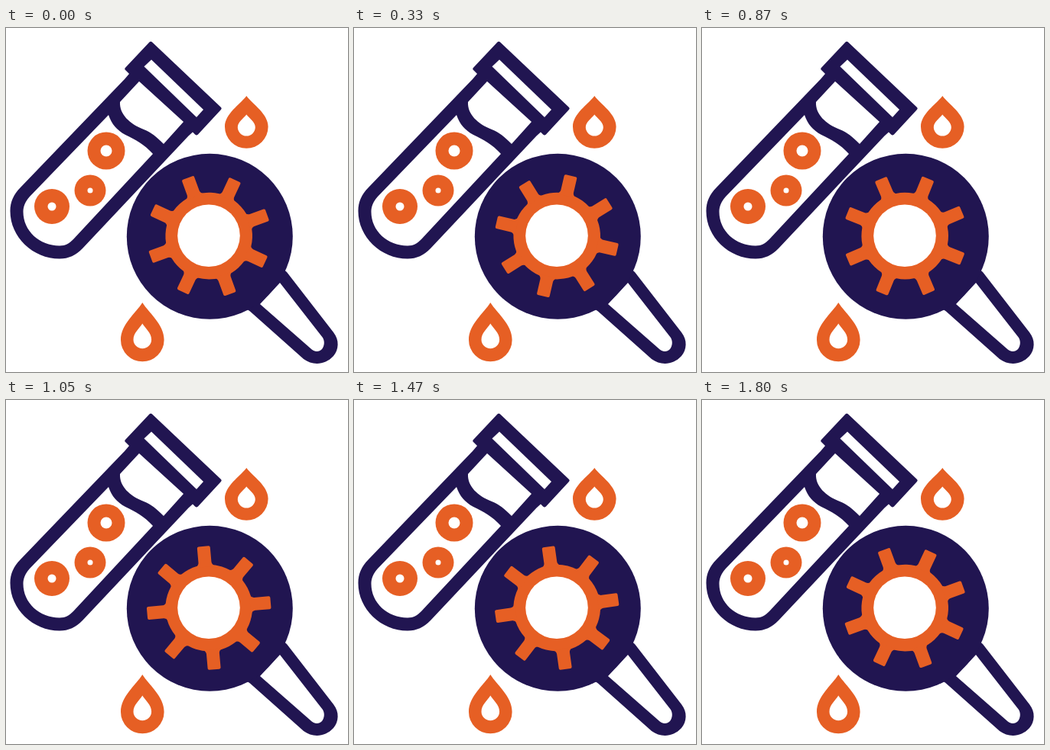
An HTML page that plays this animation: 447x451 px, repeating every 1.83 s.

```html
<!DOCTYPE html>
<html lang="en">
<head>
<meta charset="utf-8">
<title>Test tube and turning gear</title>
<style>
  html, body { margin: 0; width: 100%; height: 100%; overflow: hidden; background: #fff; }
  svg { display: block; width: 100%; height: 100%; }
  .navy { fill: #211551; }
  .orange { fill: #e65f24; }
  .white { fill: #fff; }
</style>
</head>
<body>
<svg viewBox="0 0 447 451">
  <g id="tube">
    <path class="navy" d="M187 19Q189 16.5 191.500 19L281 104Q282.500 105.500 281 107L251 139.500Q249 141.500 247 139.500L244 136.500L238.500 141.500L100 289C91 298 82 302.500 70 302.500C35 302.500 5.500 274 5.500 240C5.500 228 10 218 18.500 209.500L155.500 66.500L161 60L155.500 54.500Q154.500 53.500 156 52Z"/>
    <path class="white" d="M190 41.500L258 107L249 117L180.500 50.500Z"/>
    <path class="white" d="M174 70L232 123L206 152C196 142 190 137 180 133C162 126 148 113 149 97Z"/>
    <path class="white" d="M134 114C138 126 145 134 156 140C170 147 180 152 192 165L88 277C83 282 78 285.500 70 285.500C44 285.500 22.500 266 22.500 241C22.500 234 25 228 31 221Z"/>
  </g>
  <g id="cells"></g>
  <g id="drops"></g>
  <g id="lens">
    <path class="navy" d="M363 314Q364 318 367 320L428 399C436 409 435 422 428 430C417 442 401 443 389 434L319 371.500Q317 369 313 369L340 330Z"/>
    <path class="white" d="M358 334L332 362L398 420C403 425 409 425 413 421C416 417 417 411 414 406Z"/>
    <circle class="navy" cx="266.300" cy="273.300" r="108.500"/>
  </g>
  <g id="gear" class="orange"><circle r="56.800"/></g>
  <circle class="white" cx="265" cy="272.200" r="40.800"/>
</svg>
<script>
  const STEP_MS = 30, STEPS = 61, DEGREES_PER_STEP = 3, START_ANGLE = 25;
  const TEETH = 8;
  const TOOTH = 'M-12.5-54Q-8.5-57-8.5-60V-79Q-8.5-81-6.5-81H6.5Q8.5-81 8.5-79V-60Q8.5-57 12.5-54Z';
  const byId = id => document.getElementById(id);
  const gear = byId('gear');

  function add(parent, tag, attributes) {
    const node = document.createElementNS('http://www.w3.org/2000/svg', tag);
    for (const name in attributes) node.setAttribute(name, attributes[name]);
    parent.append(node);
  }

  function addCell(x, y, radius, hole) {
    add(byId('cells'), 'circle', { class: 'orange', cx: x, cy: y, r: radius });
    add(byId('cells'), 'circle', { class: 'white', cx: x, cy: y, r: hole });
  }

  function addDrop(x, top, cy, r, color) {
    const h = cy - top;
    const d = `M${x} ${top}C${x + r * 0.3} ${top + h * 0.28} ${x + r} ${cy - h * 0.42} ${x + r} ${cy}
      A${r} ${r} 0 0 1 ${x - r} ${cy}
      C${x - r} ${cy - h * 0.42} ${x - r * 0.3} ${top + h * 0.28} ${x} ${top}Z`;
    add(byId('drops'), 'path', { class: color, d });
  }

  addCell(131, 161, 24.5, 7.5);
  addCell(110, 213, 20.5, 3.5);
  addCell(60, 234, 23, 5.5);

  addDrop(314.3, 89, 129.5, 28.3, 'orange');
  addDrop(314.3, 113.5, 130, 11.5, 'white');
  addDrop(178.3, 360, 409, 28.3, 'orange');
  addDrop(178.3, 387.5, 408.5, 11.8, 'white');

  for (let i = 0; i < TEETH; i++) {
    add(gear, 'path', { d: TOOTH, transform: `rotate(${i * 360 / TEETH})` });
  }

  function draw(ms) {
    const step = Math.floor(ms / STEP_MS) % STEPS;
    gear.setAttribute('transform', `translate(265.2 272.6) rotate(${START_ANGLE + step * DEGREES_PER_STEP})`);
  }

  const start = performance.now();
  function tick() {
    draw(performance.now() - start);
    requestAnimationFrame(tick);
  }
  draw(0);
  requestAnimationFrame(tick);
</script>
</body>
</html>
```
